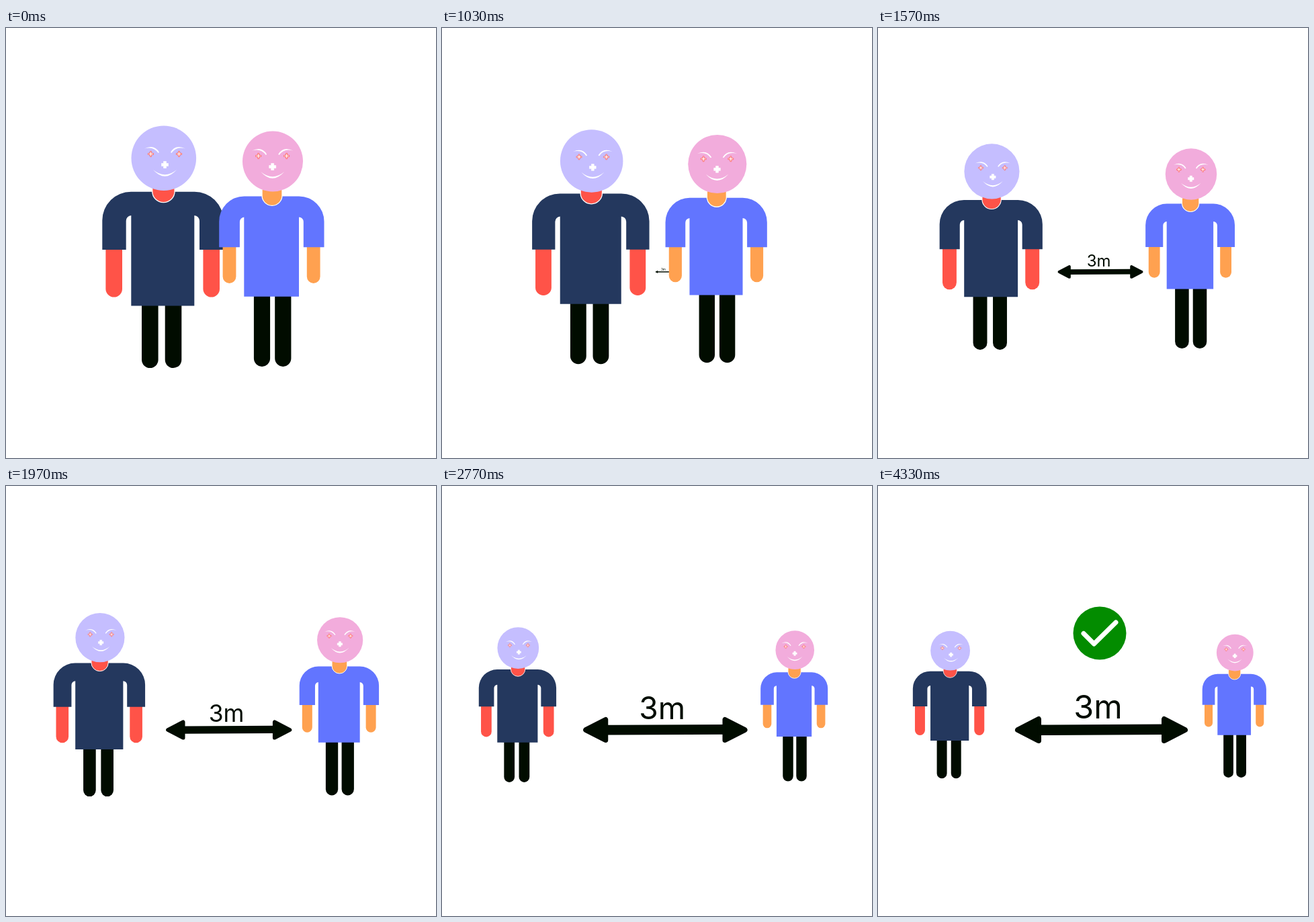
These frames come from a looping animation (640 by 640 pixels, 6010 ms). An HTML page:

```html
<!DOCTYPE html>
<html lang="en">
<head>
<meta charset="utf-8">
<title>Keep your distance</title>
<style>
html, body { margin: 0; width: 100%; height: 100%; overflow: hidden; background: #fff; }
svg { display: block; width: 100vw; height: 100vh; }
text { font: 48.5px Inter, "Liberation Sans", sans-serif; text-anchor: middle; }
</style>
</head>
<body>
<svg viewBox="0 0 640 640">
  <defs>
    <!-- origin: the bridge of the nose -->
    <g id="face" fill="#fff">
      <g id="side">
        <path d="M-30.5 -24Q-16 -31-8.500 -18.500L-10 -17.500Q-17 -28-30.500 -24Z"/>
        <path d="M-22-20v3h-3v2h3v3h2v-3h3v-2h-3v-3z" stroke="#ff5348" stroke-width=".8"/>
      </g>
      <use href="#side" transform="scale(-1 1)"/>
      <path d="M-2-5h4v3h3v4h-3v3h-4v-3h-3v-4h3z" stroke="#fff" stroke-width=".6" stroke-linejoin="round"/>
      <path d="M-17.500 7.500Q0 27 17.500 7.500Q0 22-17.500 7.500Z"/>
    </g>
  </defs>

  <g id="arrow" fill="#010c00">
    <path d="M-121.600 0l31-16v32zM127.400 0l-31-16v32z" stroke="#010c00" stroke-width="8" stroke-linejoin="round"/>
    <path d="M-92-7.500L98-8.500V7L-92 8Z"/>
    <text x="-2.100" y="-17">3m</text>
  </g>

  <g id="left">
    <g fill="#010c00">
      <path d="M202 405h24.600v88.700a12.300 12.300 0 0 1-24.600 0z"/>
      <path d="M236.700 405h24.600v88.700a12.300 12.300 0 0 1-24.600 0z"/>
    </g>
    <g fill="#ff5348">
      <path d="M148.400 325h24.600v63.200a12.300 12.300 0 0 1-24.600 0z"/>
      <path d="M293.400 325h24.600v63.200a12.300 12.300 0 0 1-24.600 0z"/>
    </g>
    <path fill="#24385e" d="M186 243.800H280.500A43 42.500 0 0 1 323.500 286.300V330H288V287A8 8 0 0 0 280.300 279V413.500H186.300V279A8 8 0 0 0 178.700 287V330H143.300V286.300A42.700 42.500 0 0 1 186 243.800Z"/>
    <path fill="#ff5348" stroke="#fff" stroke-width="1.300" d="M217.700 234v9a16.700 16.700 0 0 0 33.400 0v-9z"/>
    <circle cx="234.800" cy="193.700" r="48.300" fill="#c5beff"/>
    <use href="#face" x="236.500" y="203.500"/>
  </g>

  <g id="right">
    <g fill="#010c00">
      <path d="M368.900 392h24.200v99.800a12.100 12.100 0 0 1-24.200 0z"/>
      <path d="M400.200 392h24.200v99.800a12.100 12.100 0 0 1-24.200 0z"/>
    </g>
    <g fill="#ffa150">
      <path d="M322.600 320h19.800v50.100a9.900 9.900 0 0 1-19.800 0z"/>
      <path d="M447.800 320h19.800v50.100a9.900 9.900 0 0 1-19.800 0z"/>
    </g>
    <path fill="#6275ff" d="M354.500 250.400H436A37.500 37.600 0 0 1 473.500 288V326.200H442.800V288.500A7 7 0 0 0 436 281.500V399.800H354.300V281.500A7 7 0 0 0 347.900 288.500V326.200H317.200V288A37.300 37.600 0 0 1 354.500 250.400Z"/>
    <path fill="#ffa150" stroke="#fff" stroke-width="1.300" d="M381 240v9.300a15 15 0 0 0 30 0v-9.300z"/>
    <circle cx="397" cy="198.500" r="45" fill="#f2acdc"/>
    <use href="#face" x="396.700" y="206.500"/>
  </g>

  <circle id="disc" cx="330" cy="219" fill="#038c00"/>
  <path id="tick" d="M-24 .5L-8.500 16L24-16" fill="none" stroke="#fff" stroke-width="7" stroke-linecap="round" stroke-linejoin="round"/>
</svg>
<script>
const LOOP = 6010, START = 630, TRAVEL = 2900, HORIZON = 325.2;
const POP = 2857, PEAK = 3500, SETTLED = 4330;
const el = id => document.getElementById(id);
const mix = (a, b, p) => a + (b - a) * p;
const span = (t, a, b) => Math.min(1, Math.max(0, (t - a) / (b - a)));

// cubic-bezier(a, 0, b, 1)
function ease(u, a, b) {
  if (u <= 0 || u >= 1) return u <= 0 ? 0 : 1;
  let lo = 0, hi = 1;
  for (let i = 0; i < 24; i++) {
    const k = (lo + hi) / 2, m = 1 - k;
    if (3 * m * m * k * a + 3 * m * k * k * b + k * k * k < u) lo = k; else hi = k;
  }
  return lo * lo * (3 - 2 * lo);
}

function place(id, x, y, scale, dx = 0, dy = 0) {
  el(id).setAttribute("transform",
    `translate(${x} ${y}) scale(${scale}) translate(${-dx} ${-dy})`);
}

function draw(t) {
  const u = span(t, START, START + TRAVEL);
  const walk = ease(u, .3, .215);
  const size = mix(1, .609, ease(u, .28, .425));
  place("left", mix(235, 107.7, walk), HORIZON, size, 235, HORIZON);
  place("right", mix(397, 531.3, walk), HORIZON, size, 397, HORIZON);
  place("arrow", 329.6, 363, ease(u, .29, .25));

  const grow = 1 - (1 - span(t, POP, PEAK)) ** 1.7;
  const settle = ease(span(t, PEAK, SETTLED), .3, .4);
  el("disc").setAttribute("r", mix(74 * grow, 39.5, settle));
  place("tick", 330, 219, settle);
}

function frame() {
  draw(performance.now() % LOOP);
  requestAnimationFrame(frame);
}
frame();
</script>
</body>
</html>
```
